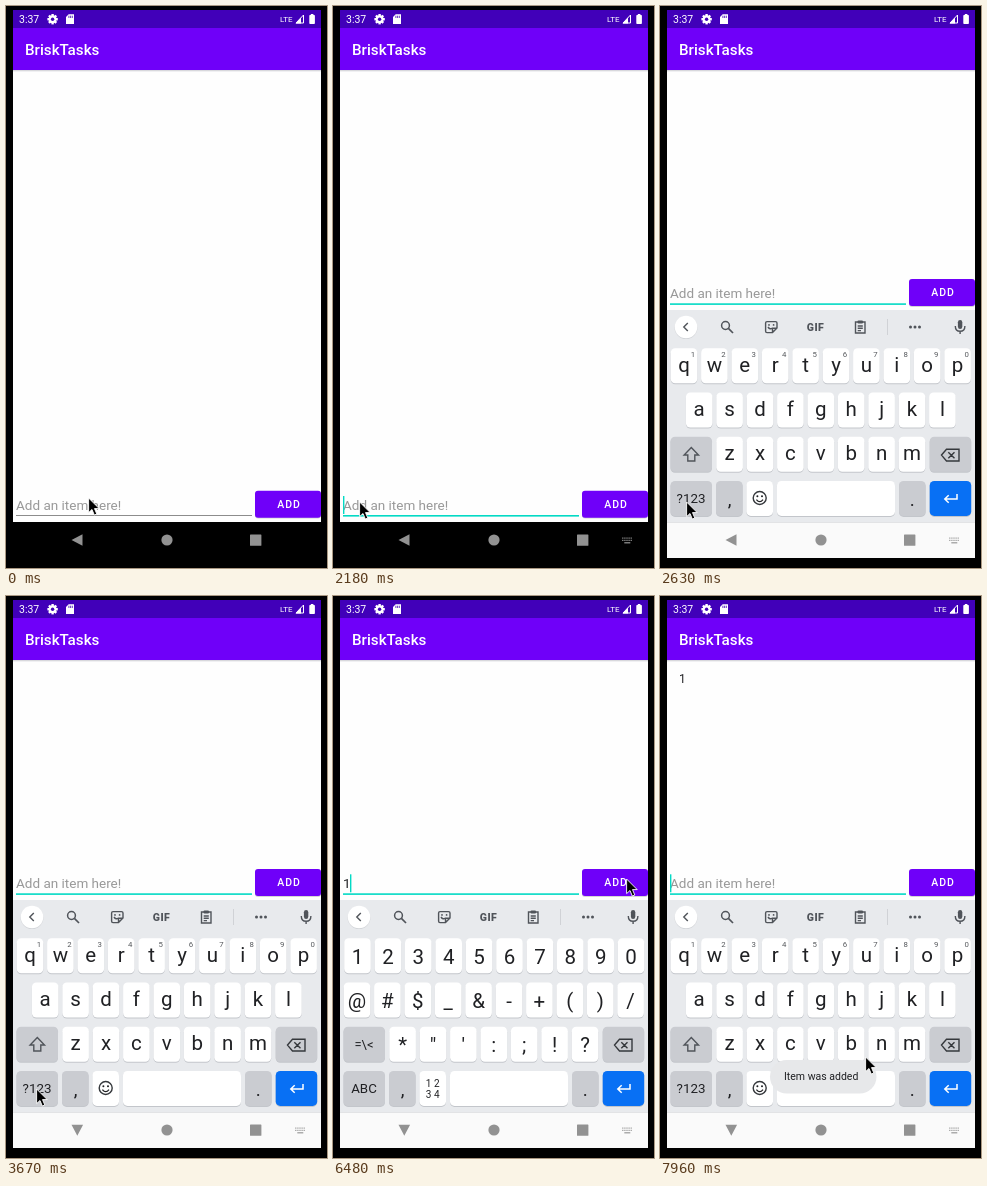
An HTML page for the animation above (8 s loop, 321 by 562 pixels).

```html
<!DOCTYPE html>
<html lang="en">
<head>
<meta charset="utf-8">
<title>To-do app</title>
<style>
html, body { margin: 0; width: 100%; height: 100%; overflow: hidden; background: #000; }
svg { display: block; width: 100vw; height: 100vh; font-family: Roboto, sans-serif; }
text { white-space: pre; }
</style>
</head>
<body>
<svg id="stage" viewBox="0 0 321 562"></svg>
<script>
const LOOP = 8000;
const PURPLE = '#6f00f9', TEAL = '#03dac5', INK = '#202124', ICON = '#50545a';

const rect = (x, y, w, h, fill, r = 0) =>
  `<rect x="${x}" y="${y}" width="${w}" height="${h}" rx="${r}" fill="${fill}"/>`;
const circle = (x, y, r, fill) => `<circle cx="${x}" cy="${y}" r="${r}" fill="${fill}"/>`;
const path = (d, fill) => `<path d="${d}" fill="${fill}"/>`;
const line = (d, color = ICON, width = 1.4) =>
  `<path d="${d}" fill="none" stroke="${color}" stroke-width="${width}"/>`;
const escapeText = s => s.replace(/&/g, '&amp;').replace(/</g, '&lt;');
const text = (s, x, y, size, fill, more = '') =>
  `<text x="${x}" y="${y}" font-size="${size}" fill="${fill}" ${more}>${escapeText(s)}</text>`;
const centered = (s, x, y, size, fill = INK, more = '') =>
  text(s, x, y, size, fill, 'text-anchor="middle" ' + more);
const group = (id, content, more = '') => `<g id="${id}" ${more}>${content}</g>`;

// Keyboard geometry
const PITCH = 30.4, FIRST = 24;
const rowY = row => 342.3 + row * 44.2;
const key = (x, row, w = 26.6, fill = '#fff') =>
  rect(x, rowY(row) + 1, w, 35, '#c3c6cb', 4.5) + rect(x, rowY(row), w, 35, fill, 4.5);
const keyRow = (chars, row, start, baseline) => [...chars].map((c, i) => {
  const x = start + i * PITCH;
  return key(x - 13.3, row) + centered(c, x, baseline + row * 44.2, 20.5);
}).join('');

function statusBar() {
  const teeth = [0, 45, 90, 135].map(a =>
    `<rect x="45.4" y="8" width="2.4" height="10.4" fill="#fff" transform="rotate(${a} 46.6 13.2)"/>`).join('');
  return rect(7, 4, 308, 18, '#4100b9') +
    text('3:37', 13, 17, 10.5, '#fff') +
    teeth + circle(46.6, 13.2, 3.9, '#fff') + circle(46.6, 13.2, 1.7, '#4100b9') +
    path('M62.7 8.3H68V18H60V11Z', '#fff') + line('M62.9 9.7V12M64.6 9.7V12M66.3 9.7V12', '#4100b9', .8) +
    text('LTE', 274, 16.3, 8, '#fff') +
    line('M297.5 9V17H290Z', '#fff', 1) + path('M295 11.5V17.4H289.5Z', '#fff') +
    rect(303.3, 9, 5.6, 9, '#fff', .8) + rect(304.8, 8, 2.6, 2, '#fff');
}

function inputBar() {
  return group('idleLine', rect(10, 509, 236, 1, '#8c8c8c')) +
    group('focusLine', rect(10, 509, 236, 1.6, TEAL)) +
    group('hint', text('Add an item here!', 10, 504, 13.5, '#999')) +
    group('typed', text('1', 10, 504, 13.5, INK)) +
    group('caret', rect(10, 490, 1.4, 18, TEAL)) +
    rect(249, 485.6, 66, 27, '#d5d5d5', 3) + rect(249, 484.7, 66, 27, PURPLE, 3) +
    centered('ADD', 283, 502, 10.5, '#fff', 'font-weight="500" letter-spacing=".94"');
}

function toolbar() {
  return circle(26, 321.6, 11.5, '#d2d4d8') + circle(26, 321, 11.3, '#fff') +
    line('M27.8 317L23.8 321 27.8 325') +
    '<circle cx="65.5" cy="319.5" r="3.9" fill="none" stroke="#50545a" stroke-width="1.5"/>' +
    line('M68.4 322.4L73 327', ICON, 1.7) +
    line('M107 315.6H115.5Q117 315.6 117 317V322L112.5 326.6H107Q105.6 326.6 105.6 325V317Q105.6 315.6 107 315.6ZM112.5 326.3V322.2H116.7M108 321Q110 324 112.5 322') +
    circle(109, 318.9, .9, ICON) + circle(113.6, 318.9, .9, ICON) +
    centered('GIF', 155.5, 324.7, 10.5, ICON, 'font-weight="900" letter-spacing=".4"') +
    line('M195.5 316H205V327H195.5ZM197.7 320H202.8M197.7 322.3H202.8M197.7 324.6H201') +
    rect(197.5, 314.5, 5.5, 3, ICON, 1) +
    rect(227, 313, 1, 16, '#d0d2d6') +
    [250.5, 255, 259.5].map(x => circle(x, 321, 1.5, ICON)).join('') +
    rect(297.9, 314, 4.4, 9, ICON, 2.2) + line('M295.3 320Q295.3 325.3 300.1 325.3T304.9 320M300.1 325V328');
}

function keyboard() {
  const hints = [...'1234567890'].map((c, i) =>
    centered(c, FIRST + 9 + i * PITCH, 351, 7.8, '#55585c')).join('');
  const letters = keyRow('qwertyuiop', 0, FIRST, 366) + hints +
    keyRow('asdfghjkl', 1, FIRST + PITCH / 2, 366) +
    keyRow('zxcvbnm', 2, FIRST + PITCH * 1.5, 366) +
    line('M31.3 441.5L38.5 449H34.8V455H27.8V449H24.1Z') +
    centered('?123', 31, 497, 13.4) +
    '<circle cx="99.7" cy="492" r="6.5" fill="none" stroke="#35383c" stroke-width="1.4"/>' +
    circle(97.4, 490.2, 1, INK) + circle(102, 490.2, 1, INK) + line('M96.4 493.6Q99.7 497.8 103 493.6', INK, 1.3);
  const numbers = keyRow('1234567890', 0, FIRST + .5, 367.8) +
    keyRow('@#$_&-+()/', 1, FIRST, 367.8) +
    keyRow('*"\':;!?', 2, FIRST + PITCH * 1.5, 367.8) +
    centered('=\\<', 31, 453, 13) + centered('ABC', 31, 497, 13.3) +
    centered('1 2', 99.7, 491, 10) + centered('3 4', 99.7, 501.5, 10);
  const special = '#caccd1';
  return rect(7, 304, 308, 213, '#e8eaed') + toolbar() +
    key(10.5, 2, 41.5, special) + key(269.7, 2, 41.5, special) +
    key(10.5, 3, 41.5, special) + key(56, 3, 26.6, special) +
    key(86.4, 3) + key(117, 3, 118) + key(239, 3, 26.6, special) +
    key(269.7, 3, 41.5, '#0870f4') +
    centered(',', 69.5, 500, 19) + centered('.', 252.3, 500, 19) +
    line('M286.5 443.3H299V455H286.5L281.5 449.1ZM288.3 446.3L294.5 452.3M294.5 446.3L288.3 452.3', '#35383c') +
    line('M297 488V493H285M288.7 489.2L284.8 493 288.7 496.8', '#fff', 1.5) +
    group('letters', letters) + group('numbers', numbers);
}

function navigation() {
  const dots = [0, 1, 2, 3, 4].map(i =>
    rect(289.2 + i * 2.1, 531.5, 1.2, 1.2, '#999') + rect(289.2 + i * 2.1, 533.8, 1.2, 1.2, '#999')).join('');
  return group('lightNav', rect(7, 516, 308, 36, '#fafafa') + rect(7, 516, 308, 1, '#e2e3e5')) +
    group('back', path('M65.5 534L76.5 528.2V539.8Z', '#929292')) +
    circle(161, 534, 5.6, '#929292') + rect(244, 528.4, 11.4, 11.4, '#929292', .6) +
    group('imeIcon', dots + rect(291.3, 536.2, 6, 1.2, '#999'));
}

document.getElementById('stage').innerHTML =
  rect(0, 0, 321, 562, '#000') + rect(7, 64, 308, 452, '#fefefe') +
  rect(7, 64, 308, 1, '#d8d8dc') + rect(7, 65, 308, 1, '#f0f0f2') +
  statusBar() + rect(7, 22, 308, 42, PURPLE) +
  text('BriskTasks', 19, 49, 15.2, '#fff', 'font-weight="500"') +
  group('item', text('1', 19, 87, 12, INK)) +
  group('keyboard', keyboard()) + group('inputBar', inputBar()) + navigation() +
  group('toast', rect(110, 464, 106.5, 33.5, '#e7e8ea', 16.7) + text('Item was added', 124, 484, 10.5, INK)) +
  group('pointer', '<path d="M.6 1V15.6L4 12.5 6.3 18 8.8 17 6.5 11.6H11.2Z" fill="#000" stroke="#fff" stroke-width=".9"/>');

const parts = Object.fromEntries([...document.querySelectorAll('g[id]')].map(g => [g.id, g]));

// Each track holds its value until the next time: [ms, ...values]
const POINTER = [
  [0, 82, 491], [140, 74, 492], [290, 67, 493], [860, 61, 493], [1000, 50, 494], [1150, 40, 494],
  [1450, 33, 495], [1590, 26, 495], [3370, 32, 482], [3520, 36, 464], [3670, 30, 492],
  [4420, 29, 450], [4560, 26, 395], [4710, 24, 365], [5590, 48, 364], [5740, 100, 358], [5880, 160, 348],
  [6180, 245, 312], [6330, 309, 285], [6480, 293, 282],
  [7510, 284, 312], [7660, 255, 380], [7810, 226, 432], [7960, 205, 460]
];
const BLINK_START = [[0, 2130], [5150, 5150], [6930, 6930]];
const BACK_ANGLE = [[0, 0], [2770, -45], [2930, -90]];
const ITEM_ALPHA = [[0, 0], [7220, .5], [7360, 1]];
const TOAST_ALPHA = [[0, 0], [7660, .5], [7810, 1]];
const at = (track, t) => track.findLast(step => step[0] <= t).slice(1);
const show = (id, visible) => parts[id].setAttribute('opacity', +visible);
const move = (id, x, y) => parts[id].setAttribute('transform', `translate(${x} ${y})`);

function draw(t) {
  const focused = t >= 1890, open = t >= 2480;
  const typed = t >= 5150 && t < 7070;
  const numeric = t >= 4120 && t < 7360;
  const blink = t - at(BLINK_START, t)[0];

  show('idleLine', !focused);
  show('focusLine', focused);
  show('hint', !typed);
  show('typed', typed);
  show('caret', t >= 2030 && (blink < 0 || blink % 1000 < 500));
  move('caret', typed ? 7 : 0, 0);
  move('inputBar', 0, open ? -211.7 : 0);

  show('keyboard', open);
  show('letters', !numeric);
  show('numbers', numeric);
  show('lightNav', open);
  show('imeIcon', t >= 2180);
  parts.back.setAttribute('transform', `rotate(${at(BACK_ANGLE, t)[0]} 71.3 534)`);

  show('item', at(ITEM_ALPHA, t)[0]);
  show('toast', at(TOAST_ALPHA, t)[0]);
  move('pointer', ...at(POINTER, t));
}

function frame() {
  draw(performance.now() % LOOP);
  requestAnimationFrame(frame);
}
frame();
</script>
</body>
</html>
```
